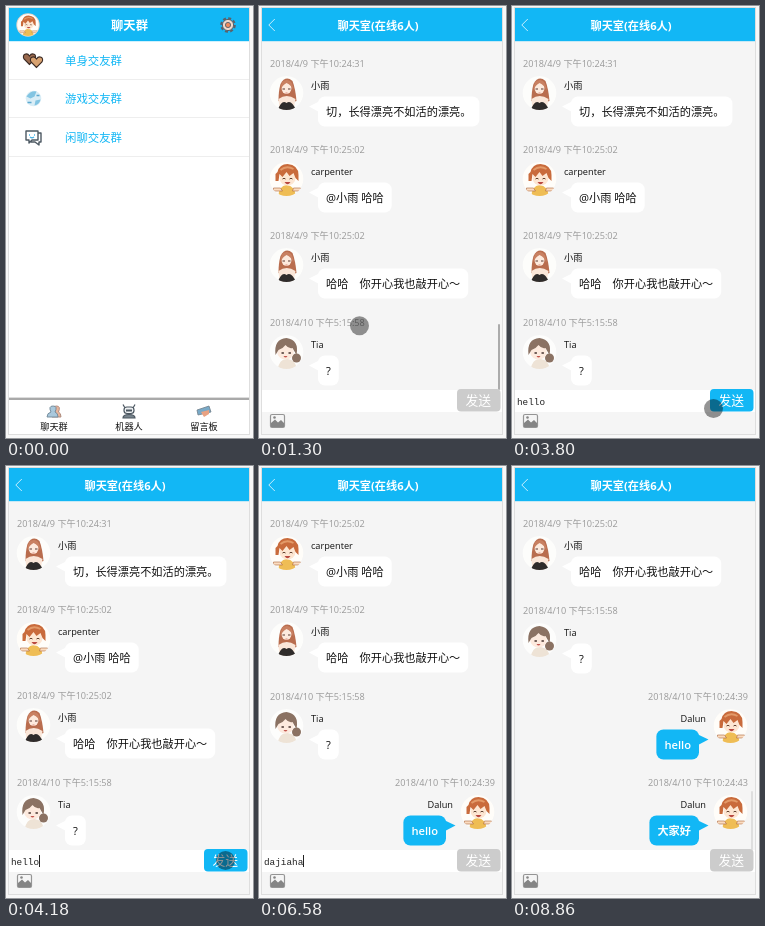
An HTML page for the animation above (9.61 s loop, 247 by 432 pixels).

```html
<!DOCTYPE html>
<html lang="zh-CN">
<head>
<meta charset="utf-8">
<title>聊天室</title>
<style>
  html, body { margin: 0; width: 100%; height: 100%; overflow: hidden; background: #f8f8f8; }
  svg { display: block; }
  text { font-family: "Open Sans", "Noto Sans CJK SC", "Noto Sans CJK", sans-serif; font-size: 11.2px; fill: #111; }
  .title { fill: #fff; font-weight: 700; text-anchor: middle; }
  .big { font-size: 12.3px; }
  .room { fill: #12b7f5; font-size: 11.4px; }
  .tab { font-size: 9.2px; text-anchor: middle; }
  .time { font-size: 9.15px; fill: #999; }
  .name { font-size: 9.2px; }
  .right { text-anchor: end; }
  .mine { fill: #fff; font-weight: 600; }
  .send { fill: #fff; font-size: 12.8px; text-anchor: middle; }
  #draft { font-family: "Liberation Mono", "Noto Sans CJK SC", "Noto Sans CJK", monospace; font-size: 9.35px; fill: #222; }
  #draft.cjk { font-size: 11.2px; }
</style>
</head>
<body>
<svg width="247" height="432" viewBox="0 0 247 432">
  <defs>
    <clipPath id="round"><circle r="17"/></clipPath>
    <clipPath id="list"><rect x="3" y="35" width="240" height="349"/></clipPath>

    <g id="girl" clip-path="url(#round)">
      <circle r="17" fill="#fdfdfb"/>
      <path d="M-8 8Q-8-2-6-9Q-1-18 6-12Q9-4 10 8Q0 12-8 8Z" fill="#b96d4e"/>
      <path d="M-7 17L-8 6Q0 0 9 6L7 17Z" fill="#fae6d8"/>
      <ellipse cy="-5" rx="5" ry="6" fill="#fdeadd"/>
      <path d="M-6-3Q-6-14 1-13Q7-12 7-2Q5-8 0-10Q-4-8-6-3Z" fill="#c98162"/>
      <path d="M-9 18Q-5 6 0 10Q5 6 10 18Z" fill="#2f2c2b"/>
      <path d="M-4-4h2.5M1.5-4h2.5" stroke="#5b3a33" stroke-width="1.2"/>
      <path d="M-1 0h2" stroke="#d0705f" stroke-width=".8"/>
    </g>
    <g id="boy" clip-path="url(#round)">
      <circle r="17" fill="#fffdf9"/>
      <path d="M-8 18Q-8 7 0 6Q9 7 9 18Z" fill="#efbd55"/>
      <path d="M-13 9H-6L-4 12H-13ZM7 9H14V12H6Z" fill="#fbdcc0" stroke="#a9643b" stroke-width=".6"/>
      <ellipse cx="1" cy="-1" rx="8" ry="7.6" fill="#fde6d2"/>
      <path d="M-11 2L-11-5L-9-7Q-7-15 1-15Q12-14 12-4L12 2L9-1L7-6L3-3L0-7L-4-2L-7-5L-8 2Z" fill="#c96b3c"/>
      <path d="M-6-9Q0-14 7-10" fill="none" stroke="#e39a68" stroke-width="1.8"/>
      <path d="M-4 0q1.500-1.500 3 0M3 0q1.500-1.500 3 0" fill="none" stroke="#60402f"/>
      <path d="M-2 3h6q-3 4.500-6 0Z" fill="#b9483f"/>
    </g>
    <g id="kid" clip-path="url(#round)">
      <circle r="17" fill="#fdfdfc"/>
      <path d="M-9 18Q-7 6 1 7Q10 8 10 18Z" fill="#eee3d6"/>
      <circle cx="10" cy="6" r="4.500" fill="#8b7263"/>
      <ellipse cx="-1" cy="0" rx="8.300" ry="7.600" fill="#fdeade"/>
      <path d="M-11 3Q-13-13 0-14Q13-12 10 3L6-4Q2-3-1-7Q-4-3-8-2Z" fill="#8b7263"/>
      <path d="M-5 1h2.400M2 1h2.400" stroke="#45322d" stroke-width="1.500"/>
      <path d="M-3 4h4q-2 3-4 0Z" fill="#c2564e"/>
    </g>
    <path id="heart" d="M0 5L-5.5-.5C-8-5-2.5-7.5 0-3.5C2.5-7.5 8-5 5.5-.5Z" stroke="#3b2a24" stroke-width="1.1"/>
    <rect id="header" x="3" y="2" width="240" height="33.2" fill="#12b7f5"/>
  </defs>

  <rect width="247" height="432" fill="#f8f8f8"/>
  <rect x="2.5" y="1.5" width="241" height="427" fill="#fff" stroke="#dedede"/>

  <g id="home">
    <use href="#header"/>
    <circle cx="22" cy="19" r="11.7" fill="#e5d5c8"/>
    <use href="#boy" transform="translate(22 19) scale(.64)"/>
    <text class="title big" x="123.5" y="23.5">聊天群</text>
    <g transform="translate(222 19)">
      <circle r="6.7" fill="none" stroke="#59616b" stroke-width="2.2" stroke-dasharray="3 2.26"/>
      <circle r="5.6" fill="#ecd8cd" stroke="#59616b"/>
      <circle r="2.6" fill="#f08a5d" stroke="#59616b" stroke-width=".9"/>
    </g>
    <path d="M3 73.5H243M3 111.5H243M3 150.5H243" stroke="#eee"/>
    <text class="room" x="59" y="59">单身交友群</text>
    <text class="room" x="59" y="97">游戏交友群</text>
    <text class="room" x="59" y="135.5">闲聊交友群</text>
    <use href="#heart" x="23.5" y="53.5" fill="#9a6a4e"/>
    <use href="#heart" x="30.5" y="56.5" fill="#d8a270"/>
    <g transform="translate(27.5 92.5)">
      <circle r="7.8" fill="#d9edf6"/>
      <path d="M-7-2Q-3-8 3-7L1-2L-3 0ZM1 7L2 2L7 1Q6 6 1 7Z" fill="#82c4e2"/>
      <path d="M-6 4h4M3-3h3" stroke="#5ba9cf" stroke-width="1.4"/>
    </g>
    <g fill="#fff" stroke="#4d5963" stroke-width="1.4" stroke-linejoin="round">
      <path d="M25 127H35V136H33V139L29 136H25Z"/>
      <path d="M20 125H32V134H26L23 137V134H20Z"/>
      <path d="M23 129h1M28 129h1M24 131q2 1.5 4 0" fill="none" stroke="#4cb4e6"/>
    </g>
    <rect x="3" y="391" width="240" height="1" fill="#ddd"/>
    <rect x="3" y="392" width="240" height="2" fill="#a9a9a9"/>
    <g stroke-width=".9">
      <path d="M46 411Q46 407 49 406Q46 400 50.5 400Q55 400 52.5 406Q55 407 55 411Z" fill="#e8b49b" stroke="#a9877a"/>
      <path d="M41 411Q41 407 45 406Q42 400 47 400Q52 400 49 406Q52 407 52 411Z" fill="#a9c8dc" stroke="#6f8797"/>
    </g>
    <g fill="#eef1f3" stroke="#4b5660" stroke-width="1.2">
      <path d="M119 402L117 398.5M127 402L129 398.5"/>
      <rect x="118" y="401" width="10" height="6.5" rx="3"/>
      <path d="M117 412Q117 408.5 123 408.5T129 412Z" fill="#78848d"/>
      <path d="M120 404.5h6" stroke-width="2"/>
    </g>
    <path d="M191 404L203 400L205 406L192 409Z" fill="#78a9c7" stroke="#71808c" stroke-width=".8"/>
    <path d="M195 406L203 404V408L198 411Z" fill="#e9a282"/>
    <text class="tab" x="48" y="423.5">聊天群</text>
    <text class="tab" x="123" y="423.5">机器人</text>
    <text class="tab" x="198" y="423.5">留言板</text>
  </g>

  <g id="chat">
    <rect x="3" y="35" width="240" height="393" fill="#f5f5f5"/>
    <g clip-path="url(#list)"><g id="messages"></g></g>
    <rect id="bar" x="239" width="2" rx="1"/>
    <use href="#header"/>
    <path d="M15.8 13L9.8 19L15.8 25" fill="none" stroke="#fff" stroke-width=".9" opacity=".85"/>
    <text class="title" x="119" y="23.5">聊天室(在线6人)</text>
    <rect x="3" y="384" width="240" height="22" fill="#fff"/>
    <text id="draft" x="5" y="399"></text>
    <rect id="caret" y="389" width="1" height="12" fill="#222"/>
    <rect id="button" x="198" y="383" width="43.5" height="22.5" rx="4"/>
    <text class="send" x="219.2" y="398.6">发送</text>
    <rect x="11.5" y="408.5" width="14" height="13" rx="1.5" fill="#f5f5f5" stroke="#959595" stroke-width="1.2"/>
    <path d="M12 420V417L16 413.5L19 416.5L22 414L25 417V421H12Z" fill="#858585"/>
    <circle cx="15.5" cy="411.5" r="1.3" fill="#858585"/>
  </g>
  <circle id="touch" r="9.5" opacity=".42"/>
</svg>

<script>
const LOOP = 9610, OPEN = 610, LOAD = 1080, SENDS = [4190, 8300];
const BLUE = '#12b7f5', ROW = 86.2, SHOWN = 4, BLINK = 500;
const $ = id => document.getElementById(id);
const clamp = v => Math.min(1, Math.max(0, v));
const set = (id, attrs) => {
  for (const key in attrs) $(id).setAttribute(key, attrs[key]);
};

const messages = [
  { face: 'girl', name: '小雨', time: '2018/4/9 下午10:24:31', text: '切，长得漂亮不如活的漂亮。' },
  { face: 'boy', name: 'carpenter', time: '2018/4/9 下午10:25:02', text: '@小雨 哈哈' },
  { face: 'girl', name: '小雨', time: '2018/4/9 下午10:25:02', text: '哈哈　你开心我也敲开心～' },
  { face: 'kid', name: 'Tia', time: '2018/4/10 下午5:15:58', text: '?' },
  { face: 'boy', name: 'Dalun', time: '2018/4/10 下午10:24:39', text: 'hello', own: true },
  { face: 'boy', name: 'Dalun', time: '2018/4/10 下午10:24:43', text: '大家好', own: true }
];

const rowY = i => Math.round(i * ROW);

function messageMarkup({ face, name, time, text, own }, i) {
  const side = own ? 'right' : '';
  const fill = own ? BLUE : '#fff';
  const tail = own ? 'M186 95.500L196.500 100.500L186 106Z' : 'M60 95.500L50 100.500L60 106Z';
  return `<g transform="translate(0 ${rowY(i)})">
    <text class="time ${side}" x="${own ? 236 : 11}" y="60.5">${time}</text>
    <use href="#${face}" x="${own ? 218.5 : 27.5}" y="87"/>
    <text class="name ${side}" x="${own ? 194 : 52}" y="82.7">${name}</text>
    <path d="${tail}" fill="${fill}"/>
    <rect class="bubble" y="90.5" height="30" rx="7" fill="${fill}"/>
    <text class="body ${own ? 'mine right' : ''}" x="${own ? 179 : 67}" y="110">${text}</text></g>`;
}

// Each bubble wraps its text with 8px of padding.
function fitBubble(row, i) {
  const length = row.querySelector('.body').getComputedTextLength();
  const bubble = row.querySelector('.bubble');
  bubble.setAttribute('x', messages[i].own ? 171 - length : 59);
  bubble.setAttribute('width', length + 16);
}

$('messages').innerHTML = messages.map(messageMarkup).join('');
const rows = [...$('messages').children];
rows.forEach(fitBubble);

// Typing: `first` letters appear at once, then one more every `pace` ms.
const drafts = [
  { text: 'hello', start: 2310, end: SENDS[0], first: 2, pace: 206 },
  { text: 'dajiahao', start: 5580, end: 6820, first: 1, pace: 150, composing: true },
  { text: '大家好', start: 6820, end: SENDS[1], first: 3, pace: 150, cjk: true }
];
const focuses = [{ start: 1550, end: SENDS[0] }, { start: 4760, end: SENDS[1] }];
const active = (list, t) => list.find(e => t >= e.start && t < e.end);

const SEND = [219.5, 394.5];
const gestures = [
  { start: 70, end: 5500, from: [190.5, 401.5], moves: [
    { start: 70, end: 380, to: [80.5, 120.5] },
    { start: 530, end: 920, to: [102.5, 160.5] },
    { start: 920, end: 1400, to: [99.5, 399.5] },
    { start: 3570, end: 3800, to: [201.5, 402.5] },
    { start: 3800, end: 4030, to: SEND },
    { start: 4190, end: 4500, to: [155.5, 399.5] }] },
  { start: 7360, end: 7430, from: [182.5, 418.5], moves: [] },
  { start: 7980, end: 8450, from: [226.5, 421.5], moves: [
    { start: 7980, end: 8130, to: SEND },
    { start: 8300, end: 8380, to: [216, 422.5] }] }
];

// The pointer advances in ticks of about 78 ms.
function pointerAt({ from, moves }, t) {
  return moves.reduce((p, { start, end, to }) => {
    const ticks = Math.round((end - start) / 78);
    const k = Math.floor(clamp((t - start) / (end - start)) * ticks) / ticks;
    return p.map((v, i) => v + (to[i] - v) * k);
  }, from);
}

function drawMessages(t) {
  const sent = SENDS.filter(s => t >= s);
  const count = t < LOAD ? 0 : SHOWN + sent.length;
  rows.forEach((row, i) => row.style.display = i < count ? '' : 'none');
  set('messages', { transform: `translate(0 ${-rowY(sent.length)})` });

  // The scroll bar shrinks as the list grows and fades after each scroll.
  const height = Math.round(80 - 3.5 * count);
  const idle = t - (sent.at(-1) ?? LOAD);
  set('bar', { y: 384 - height, height, opacity: count ? .3 * clamp((620 - idle) / 200) : 0 });
}

function drawInput(t) {
  const draft = active(drafts, t), focus = active(focuses, t);
  let shown = '', lastKey = focus ? focus.start : 0;
  if (draft) {
    const extra = Math.min(draft.text.length - draft.first, Math.floor((t - draft.start) / draft.pace));
    shown = draft.text.slice(0, draft.first + extra);
    lastKey = draft.start + extra * draft.pace;
  }
  $('draft').textContent = shown;
  set('draft', { class: draft?.cjk ? 'cjk' : '' });
  set('caret', {
    x: Math.floor(5 + shown.length * (draft?.cjk ? 11.2 : 5.61)),
    opacity: focus && (t - lastKey) % (2 * BLINK) < BLINK ? 1 : 0
  });
  set('button', { fill: draft && !draft.composing ? BLUE : '#ccc' });
}

function draw(t) {
  $('home').style.display = t < OPEN ? '' : 'none';
  $('chat').style.display = t < OPEN ? 'none' : '';
  drawMessages(t);
  drawInput(t);

  const gesture = active(gestures, t);
  $('touch').style.display = gesture ? '' : 'none';
  if (gesture) {
    const [cx, cy] = pointerAt(gesture, t);
    set('touch', { cx, cy });
  }
}

const start = performance.now();
function tick() {
  draw((performance.now() - start) % LOOP);
  requestAnimationFrame(tick);
}
tick();
</script>
</body>
</html>
```
